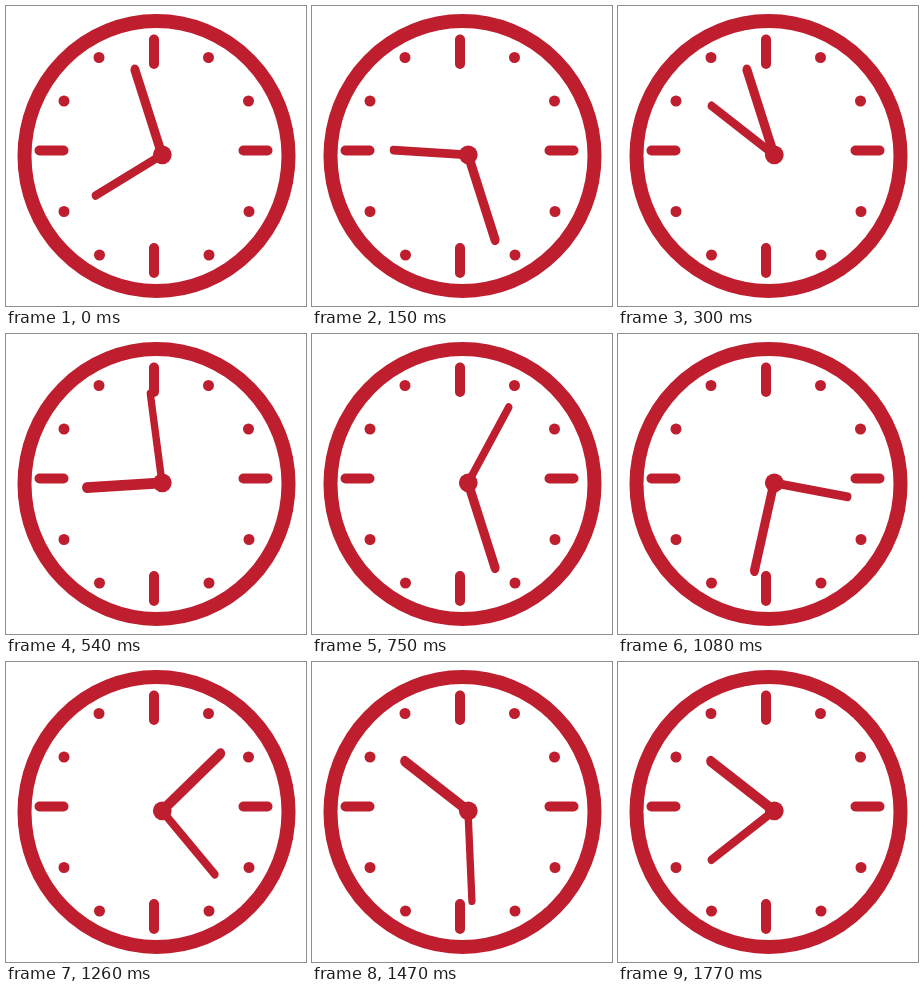
An HTML page for the animation above (1.8 s loop, 300 by 300 pixels).

```html
<!DOCTYPE html>
<html lang="en">
<head>
<meta charset="utf-8">
<title>Clock</title>
<style>
  html, body { margin: 0; width: 100%; height: 100%; overflow: hidden; background: #fff; }
  svg { display: block; width: 100vw; height: 100vh; }
</style>
</head>
<body>
<svg viewBox="0 0 300 300" fill="none" stroke="#be1e2d" stroke-linecap="round">
  <ellipse cx="150.5" cy="150" rx="132" ry="135" stroke-width="14"/>
  <path d="M148 33.5V58M148 242V267M33.5 144.5H57.5M237.5 144.5H261.5" stroke-width="10"/>
  <path d="M93 51.5h0M202.5 51.5h0M58 95h0M242.5 95h0M58 205.5h0M243 205.5h0M93.5 249h0M203 249h0" stroke-width="11"/>
  <!-- The hands turn inside a horizontally squeezed space, so their tips trace an ellipse. -->
  <g transform="translate(156 148.8) scale(.83 1)">
    <path id="slow" d="M0 0V-90" stroke-width="8.8"/>
    <path id="fast" d="M0 0V-91" stroke-width="10.8"/>
  </g>
  <circle cx="156.3" cy="148.8" r="9.4" fill="#be1e2d" stroke="none"/>
</svg>
<script>
  const LOOP = 1800, STEP = 30;
  const slow = document.getElementById('slow');
  const fast = document.getElementById('fast');

  const turn = (hand, start, turns, progress) =>
    hand.setAttribute('transform', `rotate(${start + 360 * turns * progress})`);

  function draw(ms) {
    const progress = Math.floor((ms % LOOP) / STEP) * STEP / LOOP;
    turn(slow, 243, 1, progress);
    turn(fast, 339, 6, progress);
  }

  const begin = performance.now();
  function tick() {
    draw(performance.now() - begin);
    requestAnimationFrame(tick);
  }
  tick();
</script>
</body>
</html>
```
